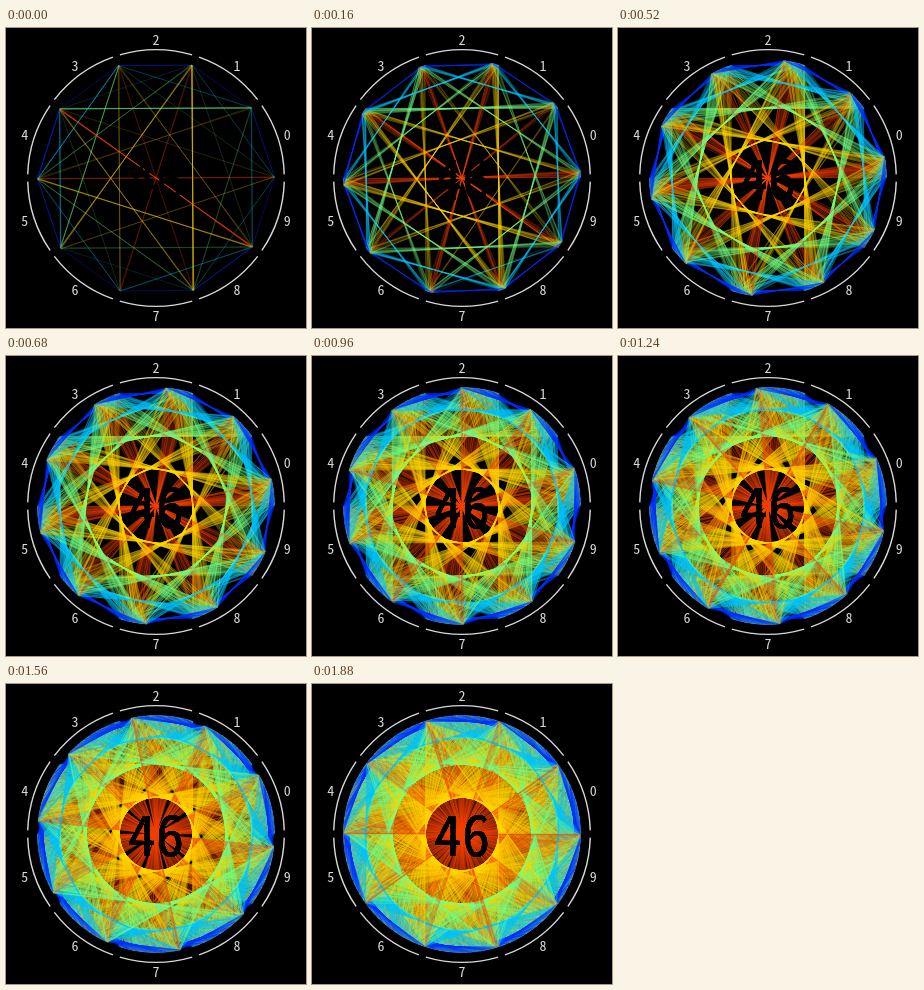
An HTML page with a canvas for the animation above (1.92 s loop, 300x300 px).

```html
<!DOCTYPE html>
<html lang="en">
<head>
<meta charset="utf-8">
<title>Digit chords</title>
<style>
html, body { margin: 0; width: 100%; height: 100%; overflow: hidden; background: #000; }
canvas { display: block; }
</style>
</head>
<body>
<canvas id="stage" width="300" height="300"></canvas>
<script>
const ctx = document.getElementById('stage').getContext('2d');
const LOOP = 1920, STEP = 40, STEPS = LOOP / STEP, PER_STEP = 160;
const TOTAL = STEPS * PER_STEP, SECTOR = Math.PI / 5, C = 150;
const FONT = '"Noto Sans Mono CJK JP", "Noto Sans CJK JP", "Liberation Sans", sans-serif';
// chord colour by the distance between its digits around the ring
const COLORS = ['', '#0032ff', '#00c0ff', '#78ff82', '#ffd200', '#f04400'];
const FREQUENT = '28 28 26 48 59 23 46 79 05 38 49 35 14'.split(' ');

let seed = 46;
function random() {
  seed = (seed + 0x6D2B79F5) | 0;
  let t = Math.imul(seed ^ (seed >>> 15), 1 | seed);
  t = (t + Math.imul(t ^ (t >>> 7), 61 | t)) ^ t;
  return ((t ^ (t >>> 14)) >>> 0) / 4294967296;
}
const pick = n => Math.floor(random() * n);

// the opening step favours a few pairs, the rest is uniform
const chords = Array.from({ length: TOTAL }, (_, i) =>
  i < PER_STEP && i % 4 === 0
    ? [...FREQUENT[pick(FREQUENT.length)]].map(Number)
    : [pick(10), pick(10)]);

const polar = (turn, r) => [C + r * Math.cos(turn * SECTOR), C - r * Math.sin(turn * SECTOR)];

function text(str, x, y, size, color) {
  ctx.font = `${size}px ${FONT}`;
  ctx.textAlign = 'center';
  ctx.fillStyle = color;
  ctx.fillText(str, x, y);
}

function drawRing() {
  ctx.fillStyle = '#000';
  ctx.fillRect(0, 0, 300, 300);
  ctx.strokeStyle = '#d8d8d8';
  ctx.lineWidth = 1.4;
  for (let d = 0; d < 10; d++) {
    ctx.beginPath();
    ctx.arc(C, C, 128.3, -(d + 0.955) * SECTOR, -(d + 0.045) * SECTOR);
    ctx.stroke();
    const [x, y] = polar(d + 0.5, 138);
    text(d, x, y + 5, 14, '#d8d8d8');
  }
}

function drawChord(i) {
  const [a, b] = chords[i];
  if (a === b) return;
  const gap = Math.abs(a - b), p = i / TOTAL;
  ctx.strokeStyle = COLORS[Math.min(gap, 10 - gap)];
  ctx.beginPath();
  ctx.moveTo(...polar(a + p, 118.5));
  ctx.lineTo(...polar(b + p, 118.5));
  ctx.stroke();
}

let drawn = 0;
function render(time) {
  const count = (Math.floor((time % LOOP) / STEP) + 1) * PER_STEP;
  if (!drawn || count < drawn) {
    drawRing();
    drawn = 0;
  }
  if (count > drawn) {
    ctx.globalAlpha = 0.17;
    ctx.lineWidth = 1;
    while (drawn < count) drawChord(drawn++);
    ctx.globalAlpha = 1;
    text('46', C, 171.5, 56, '#000');
  }
}

const start = performance.now();
function tick() {
  render(performance.now() - start);
  requestAnimationFrame(tick);
}
tick();
</script>
</body>
</html>
```
